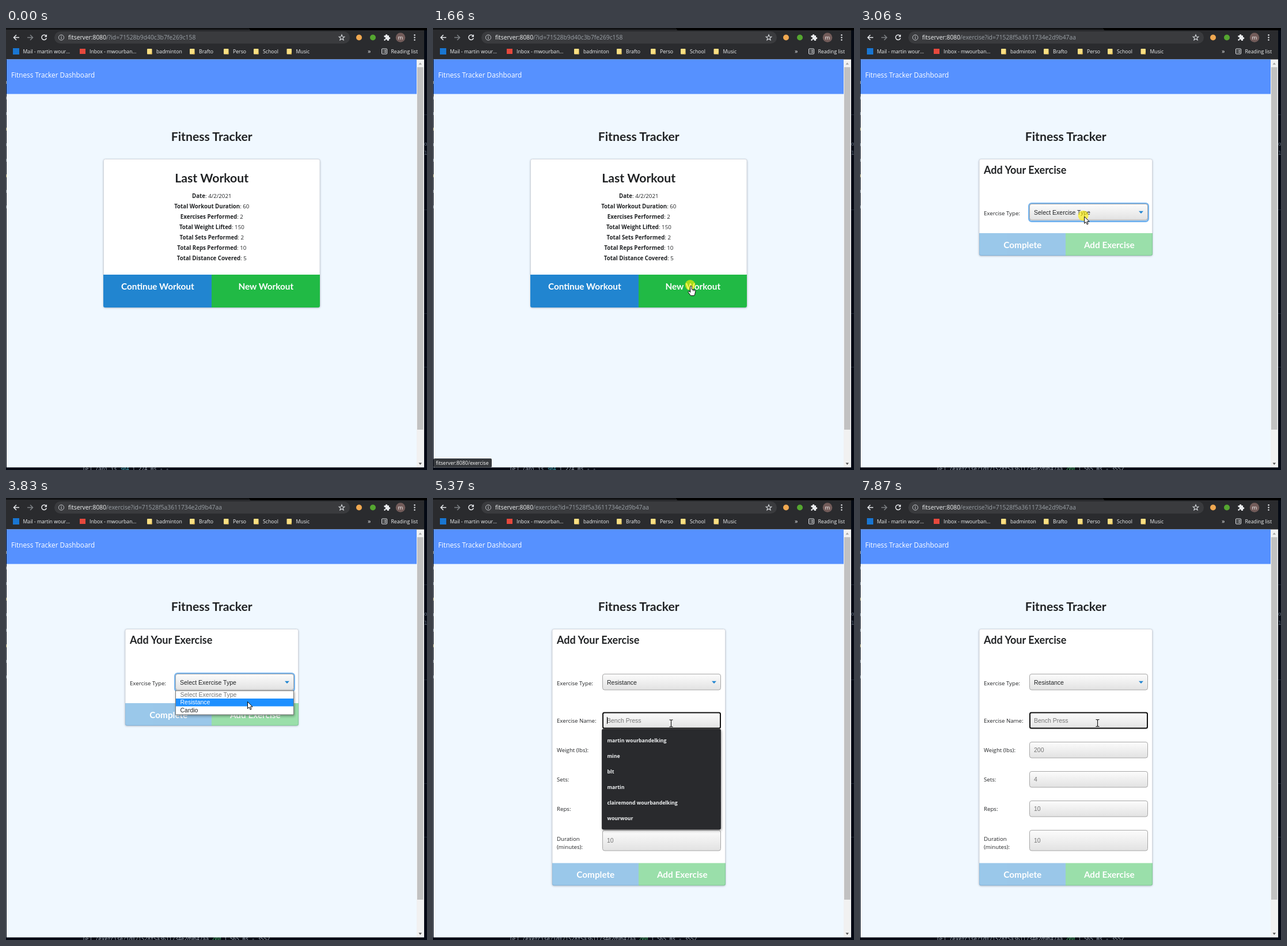
Animation, 731 px wide and 767 px high, one loop 8 s. Source, as an HTML page:

```html
<!DOCTYPE html>
<html lang="en">
<head>
<meta charset="utf-8">
<title>Fitness Tracker</title>
<style>
html, body { margin: 0; width: 100%; height: 100%; overflow: hidden; background: #040914; }
svg { display: block; width: 731px; height: 767px; }
text { font-family: "Open Sans", "Noto Sans", sans-serif; white-space: pre; }
.lato { font-family: Lato, sans-serif; font-weight: 700; }
.arial { font-family: "Liberation Sans", Arial, sans-serif; }
.mono { font-family: "Noto Sans Mono", monospace; }
.b { font-weight: 700; }
.mid { text-anchor: middle; }
.card { filter: drop-shadow(0 1px 1.5px rgba(60, 70, 90, .35)); }
.popup { filter: drop-shadow(1px 2px 2px rgba(0, 0, 0, .35)); }
</style>
</head>
<body>
<svg id="stage" viewBox="0 0 731 767" xmlns="http://www.w3.org/2000/svg">
  <defs>
    <linearGradient id="field" x2="0" y2="1">
      <stop offset="0" stop-color="#fcfcfc"/><stop offset="1" stop-color="#e2e2e2"/>
    </linearGradient>
  </defs>
</svg>
<script>
const LOOP = 8000;
const INK = '#212325';
const HOST = 'fitserver:8080';
const NEW_ID = '71528f5a3611734e2d9b47aa';

const text = (x, y, str, size, fill = INK, cls = '') =>
  `<text x="${x}" y="${y}" font-size="${size}" fill="${fill}" class="${cls}">${str}</text>`;
const rect = (x, y, w, h, fill, more = '') =>
  `<rect x="${x}" y="${y}" width="${w}" height="${h}" fill="${fill}" ${more}/>`;
const path = (d, fill, more = '') => `<path d="${d}" fill="${fill}" ${more}/>`;
const line = (d, color, width = 1.3) => path(d, 'none', `stroke="${color}" stroke-width="${width}"`);
const circle = (x, y, r, fill, more = '') => `<circle cx="${x}" cy="${y}" r="${r}" fill="${fill}" ${more}/>`;
const group = (id, body, more = '') => `<g id="${id}" ${more}>${body}</g>`;

/* desktop behind the browser window */
function desktop() {
  let s = rect(0, 0, 731, 767, '#040914');
  for (const y of [150, 315, 495, 588]) s += rect(726, y, 5, 1, '#1d2634');
  s += text(726, 204, 'o', 9, '#6b7686', 'mono') + text(726, 220, 'le', 9, '#6b7686', 'mono');
  for (let i = 0; i < 9; i++) s += rect(0, 92 + i * 27, 1, 5, i % 3 ? '#59616d' : '#8c7a4c');
  s += group('logOld', text(134, 768, 'GET /api.js <tspan fill="#4fb6c4">304</tspan> 1.274 ms - -', 8.87, '#a4abb5', 'mono'));
  s += group('logNew', text(134, 768, `GET /exercise?id=${NEW_ID} <tspan fill="#4fb66c">200</tspan> 1.565 ms - 3552`, 8.87, '#a4abb5', 'mono'));
  return s;
}

function url(id, rest) {
  return group(id, text(108, 20.2, `${HOST}<tspan fill="#9aa0a6">${rest}</tspan>`, 10.3, '#f1f3f4'));
}

function browser() {
  const white = '#e8eaed', dim = '#7d8084';
  let s = rect(0, 0, 726, 55, '#2a2b2e') + path('M0 0H731V4H426Q422 4 422 0Z', '#000');
  s += rect(0, 0, 422, 3, '#111214');
  s += rect(84, 6, 513, 21, '#3a3b3e', 'rx="10.5"');
  s += line('M23 16.5H13.5M18 12L13.5 16.5L18 21', white, 1.5);
  s += line('M37 16.5H46.5M42 12L46.5 16.5L42 21', dim, 1.5);
  s += group('reload', line('M69.6 13.6A4.3 4.3 0 1 0 70.3 17.5', white, 1.5) + path('M71 11V15.5H66.5Z', white));
  s += group('stop', line('M62 12.5L70 20.5M70 12.5L62 20.5', white, 1.5));
  s += circle(96, 16.5, 4.6, 'none', 'stroke="#c4c7cb"') + rect(95.5, 15.8, 1.1, 3.2, '#c4c7cb') + rect(95.5, 13.8, 1.1, 1.2, '#c4c7cb');
  s += url('urlOld', '/?id=71528b9d40c3b7fe269c158') + url('urlNew', `/exercise?id=${NEW_ID}`);

  let star = '';
  for (let i = 0; i < 10; i++) {
    const a = i * Math.PI / 5 - Math.PI / 2, r = i % 2 ? 2.2 : 5.2;
    star += `${i ? 'L' : 'M'}${(583 + r * Math.cos(a)).toFixed(1)} ${(16.8 + r * Math.sin(a)).toFixed(1)}`;
  }
  s += line(star + 'Z', '#d5d8dc', 1.1);
  s += circle(613, 16.5, 5, '#f0a850') + circle(637, 16.5, 5, '#55a630');
  s += path('M656.5 13H659A1.7 1.7 0 1 1 662.3 13H665V16A1.7 1.7 0 1 1 665 19.2V22H661.8A1.7 1.7 0 1 0 658.6 22H656.5V19A1.7 1.7 0 1 0 656.5 16Z', white);
  s += circle(685, 16.5, 8.3, '#735c5a') + text(685, 19.6, 'm', 9.5, '#fff', 'mid');
  for (const y of [12.3, 16.5, 20.7]) s += circle(709.5, y, 1.2, white);

  s += rect(12, 35, 11, 11, '#1976d2') + rect(128, 36, 10, 9, '#e5483d');
  const marks = [[29.5, 'Mail - martin wour...'], [145, 'Inbox - mwourban...'], [261, 'badminton'], [335, 'Brafto'],
    [394, 'Perso'], [446, 'School'], [503.5, 'Music'], [668.5, 'Reading list']];
  marks.forEach(([x, name], i) => {
    s += text(x, 43.6, name, 8.7, '#f1f3f4');
    if (i > 1 && i < 7) s += rect(x - 16, 36, 8.5, 9.5, '#fbdf82', 'rx="1"') + rect(x - 9.5, 43, 2, 2.5, '#e5bd4e');
  });
  s += text(628, 44, '»', 11, white);
  s += rect(652.5, 36, 9, 9, 'none', `stroke="${white}" rx="1"`) + line('M654.5 38.5h1M654.5 40.5h1M654.5 42.5h1M657 38.5h3M657 40.5h3M657 42.5h3', white, 1);
  return s;
}

function page() {
  let s = rect(1, 54.5, 712, 708, '#f0f8ff') + rect(1, 54.5, 712, 60, '#5691ff');
  s += text(9, 86, 'Fitness Tracker Dashboard', 11.8, '#fff');
  s += text(357.2, 196, 'Fitness Tracker', 21.2, INK, 'lato mid');
  s += rect(713, 54.5, 13, 708, '#f1f1f1') + rect(714, 68, 10.5, 629, '#c1c1c1');
  s += path('M716.5 63.5L719.3 60L722 63.5Z', '#a3a3a3') + path('M716.5 754.5L719.3 758L722 754.5Z', '#505050');
  return s;
}

function buttons(x, right, y, h, baseline, labels, alpha) {
  const mid = 357, blue = mid - x, green = right - mid;
  const body = path(`M${x} ${y}h${blue}v${h}h${3 - blue}q-3 0 -3 -3Z`, '#2185d0')
    + path(`M${mid} ${y}h${green}v${h - 3}q0 3 -3 3h${3 - green}Z`, '#21ba45');
  const centers = [x + blue / 2 + .3, mid + green / 2 + .3];
  return `<g opacity="${alpha}">${body}</g>`
    + labels.map((t, i) => text(centers[i], baseline, t, 15.3, '#fff', 'lato mid')).join('');
}

const card = (x, w, h) =>
  `<g class="card">${rect(x, 227.5, w, h, '#fff', 'rx="3" stroke="#d3d7de"')}</g>`;

function lastWorkout() {
  const rows = [['Date', '4/2/2021'], ['Total Workout Duration', 60], ['Exercises Performed', 2], ['Total Weight Lifted', 150],
    ['Total Sets Performed', 2], ['Total Reps Performed', 10], ['Total Distance Covered', 5]];
  let s = card(169.5, 375.5, 257) + text(357.2, 267.5, 'Last Workout', 21.2, INK, 'lato mid');
  rows.forEach(([k, v], i) => {
    s += text(357.3, 295 + 18 * i, `<tspan class="b">${k}</tspan>: ${v}`, 9.7, INK, 'mid');
  });
  return s + buttons(169, 545, 428, 57, 454, ['Continue Workout', 'New Workout'], 1);
}

const field = (y, h = 28) => rect(294.5, y + .5, 205, h - .5, 'url(#field)', 'rx="3.5" stroke="#a6a6a6"');
const label = (y, str) => text(215, y, str, 9.67);
const value = (y, str, fill = INK) => text(302, y, str, 10.5, fill, 'arial');

function formHead() {
  return text(215, 252.5, 'Add Your Exercise', 18, INK, 'lato') + label(324.5, 'Exercise Type:')
    + group('ring', rect(293.5, 304.5, 207, 31, 'none', 'rx="4.5" stroke="#76b4ee" stroke-width="3"'))
    + field(305) + group('typeNone', value(323.5, 'Select Exercise Type')) + group('typeSet', value(323.5, 'Resistance'))
    + path('M484 317.8H492L488 322Z', '#2185d0');
}

const formButtons = y => buttons(207, 508, y, 39, y + 25.8, ['Complete', 'Add Exercise'], .45);

function resistanceFields() {
  const rows = [['Exercise Name:', ''], ['Weight (lbs):', 200], ['Sets:', 4], ['Reps:', 10]];
  let s = '';
  rows.forEach(([name, hint], i) => {
    const y = 372 + 51 * i;
    s += label(y + 18, name) + field(y) + value(y + 17.6, hint, '#757575');
  });
  s += group('hint', value(389.6, 'Bench Press', '#757575')) + group('typed', value(389.6, 'b'));
  s += label(594.5, 'Duration') + label(608.5, '(minutes):') + field(576, 36) + value(597.6, 10, '#757575');
  s += group('focus', rect(295, 372.5, 204, 27, 'none', 'rx="2.5" stroke="#101010" stroke-width="2"'));
  return s + rect(302, 380, 1, 12, '#000', 'id="caret"');
}

function typeMenu() {
  const names = ['Select Exercise Type', 'Resistance', 'Cardio'];
  const item = (i, fill) => text(302.5, 344.8 + 13.5 * i, names[i], 10.5, fill, 'arial');
  return `<g class="popup">${rect(294.5, 334.5, 205, 41.5, '#fff', 'stroke="#767676"')}</g>`
    + item(0, '#757575') + item(1, INK) + item(2, INK)
    + group('pick', rect(295, 348, 204, 13.5, '#1e90ff') + item(1, '#fff'));
}

function suggestions(names) {
  return `<g class="popup">${rect(293.5, 401, 206, names.length * 27 + 12, '#292a2d', 'rx="2" stroke="#222326" stroke-width=".8"')}</g>`
    + names.map((n, i) => text(302.5, 424 + 27 * i, n, 8.7, '#f1f3f4', 'b')).join('');
}

function pointers() {
  const edge = 'stroke="#000" stroke-width="1" stroke-linejoin="round"';
  return circle(0, 0, 9, '#fff000', 'id="click" opacity=".62"')
    + group('arrow', path('M.5 .5V12.5L3.2 10L5.1 14.2L7 13.4L5.2 9.3H9Z', '#fff', edge))
    + group('hand', path('M-1.3 10V1.2Q0 -.6 1.3 1.2V6.4L6.6 7.6Q8 8 7.9 9.5L7 13.6Q6.6 16 5.5 17.4H-.6L-4.8 11.6Q-5.2 9.6 -3.2 9.8L-1.3 11.8Z', '#fff', edge)
      + line('M3.3 7.2V9.6M5.5 7.6V9.8', '#000', .8))
    + group('beam', line('M-3 -6H-1L0 -5L1 -6H3M0 -5V5M-3 6H-1L0 5L1 6H3', '#111', 1.1));
}

const stage = document.getElementById('stage');
stage.innerHTML += desktop() + browser() + page()
  + group('last', lastWorkout())
  + group('form', group('shortCard', card(207, 300.5, 167) + formButtons(356))
    + group('tallCard', card(207, 300.5, 444.5) + formButtons(633.5))
    + formHead() + group('fields', resistanceFields()))
  + group('menu', typeMenu())
  + group('listAll', suggestions(['martin wourbandelking', 'mine', 'blt', 'martin', 'clairemond wourbandelking', 'wourwour']))
  + group('listOne', suggestions(['blt']))
  + group('status', rect(1, 747, 101, 15.5, '#36393d', 'rx="2"') + text(5, 758.2, `${HOST}/exercise`, 8.7, '#fff'))
  + pointers();

/* when each part is on screen, ms */
const spans = {
  logOld: [[0, 1740]], logNew: [[1740, LOOP]],
  urlOld: [[0, 1670]], urlNew: [[1670, LOOP]],
  reload: [[0, 1670], [1970, LOOP]], stop: [[1670, 1970]],
  last: [[0, 1740]], form: [[1740, LOOP]], status: [[1590, 1970]],
  shortCard: [[0, 3900]], tallCard: [[3900, LOOP]], fields: [[3900, LOOP]],
  typeNone: [[0, 3900]], typeSet: [[3900, LOOP]],
  ring: [[3060, 5060]], menu: [[3130, 3900]], pick: [[3440, 3900]],
  focus: [[5060, LOOP]], caret: [[5060, 5540], [6070, 6620], [7170, 7320]],
  hint: [[0, 7320], [7720, LOOP]], typed: [[7320, 7720]],
  listAll: [[5060, 7320]], listOne: [[7320, 7870]],
  click: [[1510, 1740], [3060, 3210], [4910, 5140]],
  arrow: [[740, 1280], [1890, 4680]], hand: [[1280, 1890]], beam: [[4680, LOOP]]
};
const track = [[740, 693, 646], [970, 556, 552], [1202, 444, 490], [1356, 408, 458], [1510, 448, 447], [1890, 448, 447],
  [1970, 452, 450], [2120, 452, 450], [2210, 571, 439], [2430, 571, 439], [2750, 390, 365], [2900, 286, 336],
  [3060, 396, 326], [3210, 412, 326], [3350, 412, 326], [3510, 419, 353], [4060, 419, 353], [4070, 418, 353],
  [4290, 418, 353], [4850, 413.5, 391], [5360, 413.5, 391], [5370, 412.5, 390.5], [LOOP, 412.5, 390.5]];
const byId = id => document.getElementById(id);
const parts = Object.entries(spans).map(([id, on]) => [byId(id), on]);
const movers = ['arrow', 'hand', 'beam'].map(byId);
const click = byId('click'), status = byId('status'), listOne = byId('listOne');

/* the pointer is sampled at about 13 steps a second */
function pointerAt(t) {
  const s = Math.max(740, 740 + 77 * Math.floor((t - 740) / 77 + .1));
  const i = Math.max(1, track.findIndex(k => k[0] > s));
  const [t0, x0, y0] = track[i - 1], [t1, x1, y1] = track[i];
  const p = (s - t0) / (t1 - t0);
  return [x0 + (x1 - x0) * p, y0 + (y1 - y0) * p];
}

function draw(t) {
  for (const [el, on] of parts) el.style.display = on.some(([a, b]) => t >= a && t < b) ? '' : 'none';
  const [x, y] = pointerAt(t);
  for (const el of movers) el.setAttribute('transform', `translate(${x} ${y})`);
  click.setAttribute('transform', `translate(${x - 1.5} ${y - 1})`);
  status.setAttribute('opacity', t < 1740 ? 1 : t < 1820 ? .7 : t < 1890 ? .45 : .2);
  listOne.setAttribute('opacity', t < 7720 ? 1 : t < 7795 ? .6 : .3);
}

const start = performance.now();
function tick(now) {
  draw(Math.max(0, now - start) % LOOP);
  requestAnimationFrame(tick);
}
draw(0);
requestAnimationFrame(tick);
</script>
</body>
</html>
```
